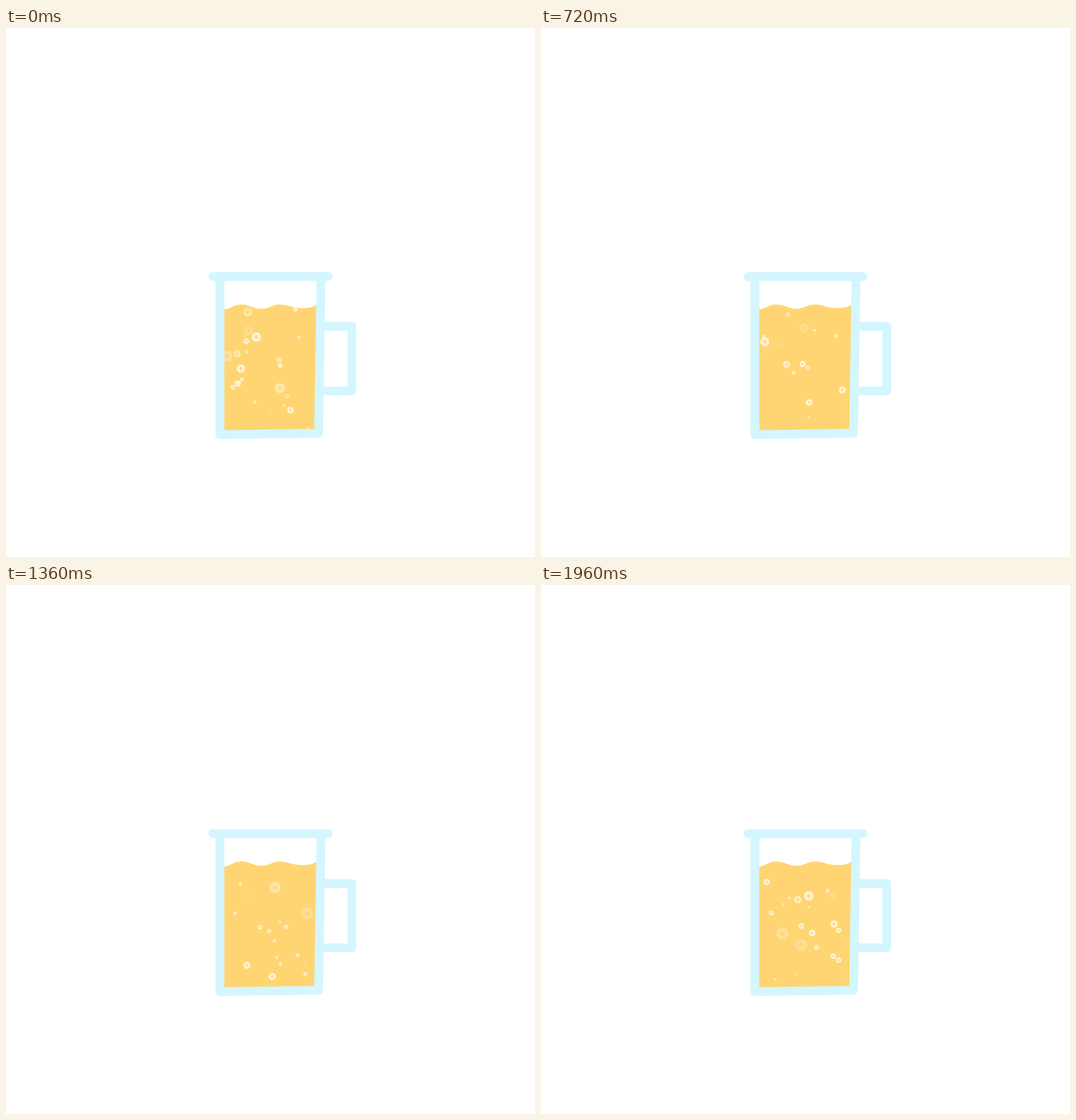
Write an HTML page with a canvas that moves like this. It is 748 by 748 pixels and loops after 2 s.

```html
<!DOCTYPE html>
<html lang="en">
<head>
<meta charset="utf-8">
<title>Fizzy mug</title>
<style>
  html, body { margin: 0; width: 100%; height: 100%; overflow: hidden; background: #fff; }
  canvas { display: block; }
</style>
</head>
<body>
<canvas id="stage" width="748" height="748"></canvas>
<script>
const ctx = document.getElementById('stage').getContext('2d');
const LOOP = 2000, STEP = 40, LIFE = 1.5, FADE = 1.05, RISE = 74;

let seed = 17;
function random(min, max) {
  seed = (seed * 16807) % 2147483647;
  return min + (max - min) * seed / 2147483647;
}

function makeBubble(birth, x, y, drift, growth = 6) {
  return { birth, x, y, drift, growth };
}

// A few leading bubbles, then random fizz that was already rising at the start
const bubbles = [
  makeBubble(-1000, 349, 511, 5),
  makeBubble(-900, 325, 548, 8),
  makeBubble(0, 426, 565, 0),
  makeBubble(100, 360, 521, 16),
  makeBubble(610, 387, 609, -14),
  makeBubble(640, 340, 591, 1),
  makeBubble(940, 346, 515, 32)
];
for (let i = 0; i < 60; i++) {
  bubbles.push(makeBubble(random(-1500, 2000), random(310, 437),
    random(440, 640), random(-30, 30), random(1.5, 5.5)));
}

function drawBubble(time, { birth, x: x0, y: y0, drift, growth }) {
  const age = (time - birth) / 1000;
  if (age < 0 || age > LIFE) return;
  const x = x0 + drift * age, y = y0 - RISE * age, r = 1 + growth * age;
  const ring = ctx.createRadialGradient(x, y, 0, x, y, r);
  for (const [stop, alpha] of [[0, 0.1], [0.28, 0.2], [0.5, 0.8], [0.8, 0.75], [1, 0.2]]) {
    ring.addColorStop(stop, `rgba(255,253,246,${alpha})`);
  }
  ctx.globalAlpha = Math.min(1, (LIFE - age) / (LIFE - FADE));
  ctx.fillStyle = ring;
  ctx.beginPath();
  ctx.arc(x, y, r, 0, 2 * Math.PI);
  ctx.fill();
}

const beer = new Path2D('M307 570V398C318 398 320 391 333 391S348 397 361 397' +
  'S375 391 387 391S405 396 418 396S432 395 440 391L436 570Z');
const glass = new Path2D(
  'M302.5 352V575L442 573L445.5 352M292.5 351.5H455.5M449 422H489V513H449');

function frame() {
  const time = Math.floor(performance.now() % LOOP / STEP) * STEP;
  ctx.clearRect(0, 0, 748, 748);

  ctx.save();
  ctx.fillStyle = '#ffd573';
  ctx.fill(beer);
  ctx.clip(beer);
  for (const bubble of bubbles) drawBubble(time, bubble);
  ctx.restore();

  ctx.strokeStyle = '#d4f6ff';
  ctx.lineWidth = 12.5;
  ctx.lineCap = ctx.lineJoin = 'round';
  ctx.stroke(glass);
  requestAnimationFrame(frame);
}
frame();
</script>
</body>
</html>
```
